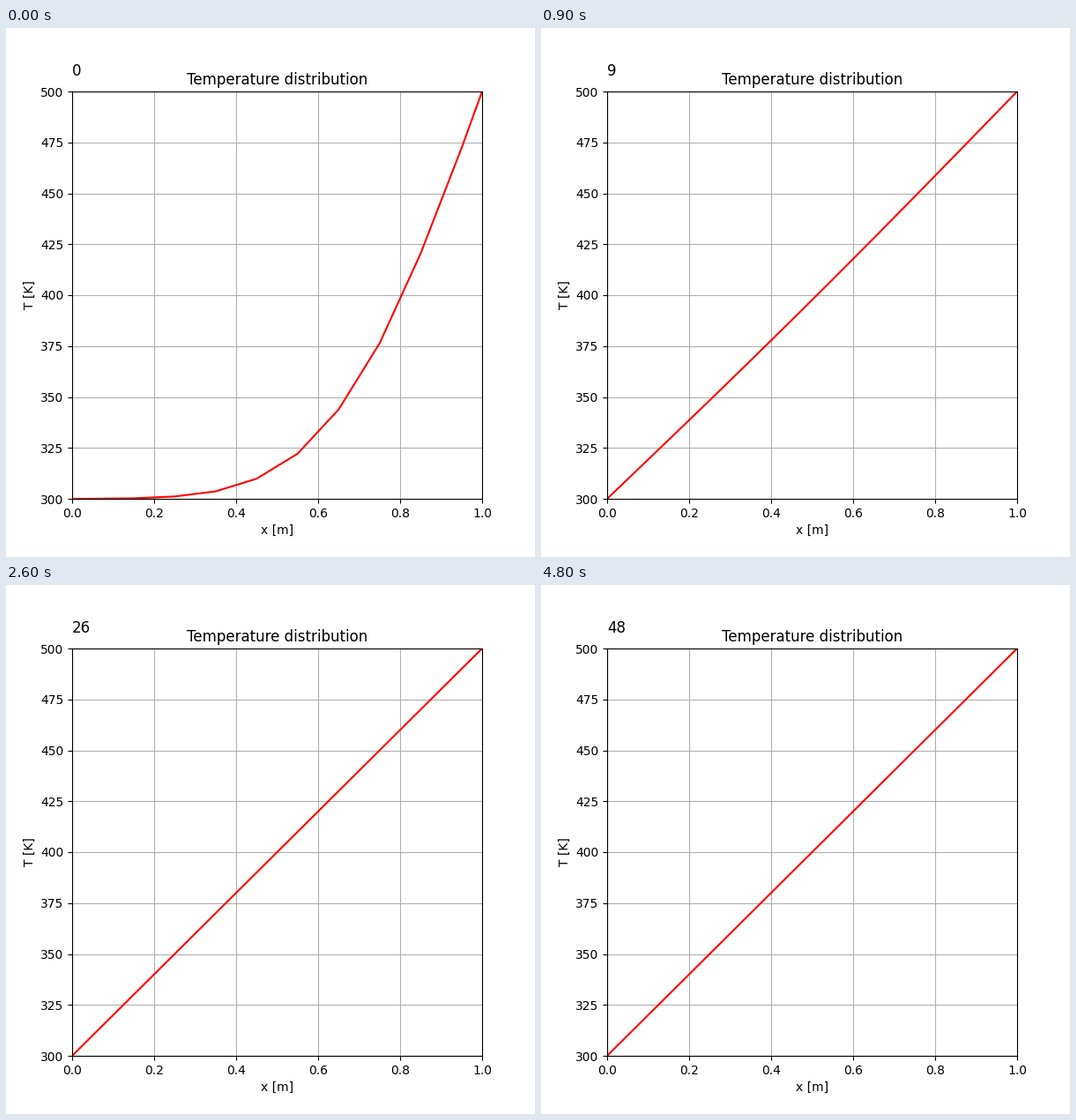
These frames come from a looping animation (600x600 px, 4.9 s). A matplotlib script:

```python
import matplotlib.pyplot as plt
import numpy as np
from matplotlib.animation import FuncAnimation

CELLS = 10
FRAMES = 49
STEPS = 10            # explicit time steps per frame
FOURIER = 0.4         # alpha * dt / dx**2
T_LEFT, T_RIGHT = 300.0, 500.0


def step(T):
    """Advance cell temperatures; ghost cells hold the walls at fixed T."""
    ghost = np.concatenate(([2 * T_LEFT - T[0]], T, [2 * T_RIGHT - T[-1]]))
    return T + FOURIER * np.diff(ghost, 2)


def solve():
    T = np.full(CELLS, T_LEFT)
    profiles = []
    for _ in range(FRAMES):
        for _ in range(STEPS):
            T = step(T)
        profiles.append(np.concatenate(([T_LEFT], T, [T_RIGHT])))
    return profiles


x = np.concatenate(([0], (np.arange(CELLS) + 0.5) / CELLS, [1]))
profiles = solve()

plt.rcParams["font.family"] = "DejaVu Sans"
fig, ax = plt.subplots(figsize=(6, 6), dpi=100)
ax.set(xlim=(0, 1), ylim=(T_LEFT, T_RIGHT), xlabel="x [m]", ylabel="T [K]")
ax.set_title("Temperature distribution")
ax.grid()
line, = ax.plot(x, profiles[0], color="red", lw=1.5)
counter = ax.text(0, 1.04, "0", transform=ax.transAxes, fontsize=12)


def update(i):
    line.set_ydata(profiles[i])
    counter.set_text(str(i))
    return line, counter


anim = FuncAnimation(fig, update, frames=FRAMES, interval=100,
                     repeat=True, repeat_delay=0)
plt.show()
```
